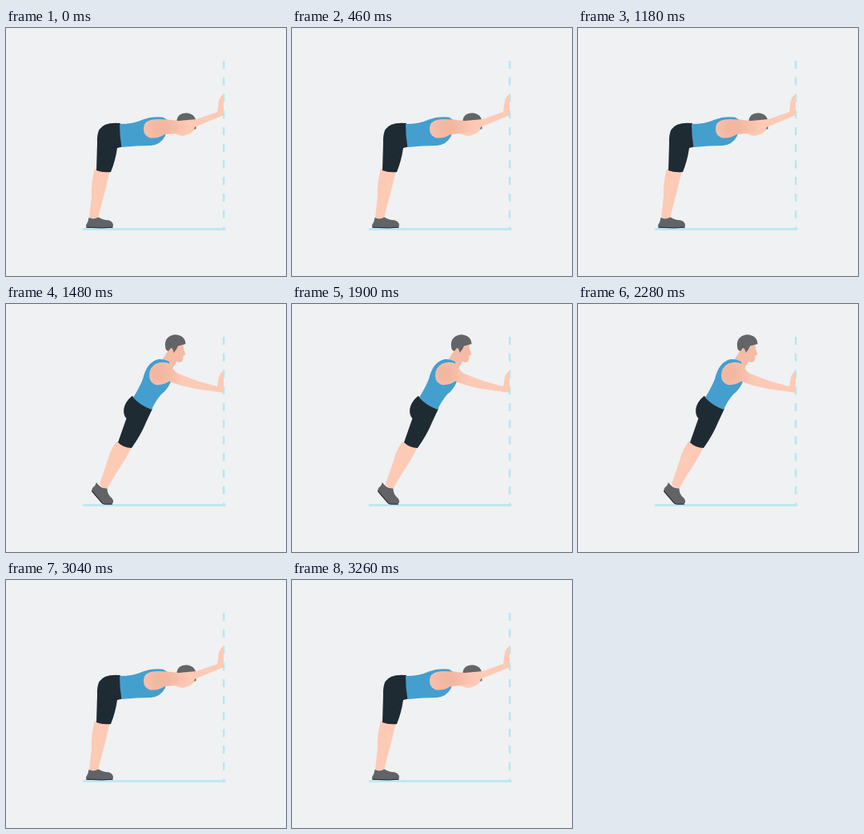
Write an HTML page that moves like this. It is 350 px wide and 310 px high and loops after 3280 ms.

```html
<!DOCTYPE html>
<html lang="en">
<head>
<meta charset="utf-8">
<title>Wall stretch</title>
<style>
  html, body { margin: 0; width: 100%; height: 100%; overflow: hidden; background: #eff1f2; }
  svg { display: block; width: 350px; height: 310px; }
  .light { fill: #fdcab6; }
  .face { fill: #f4bca7; }
  .hair { fill: #636467; }
  .shoe { fill: #626366; }
  .sole { fill: none; stroke: #353a3f; stroke-width: 1.3; stroke-linecap: round; }
  .shorts { fill: #1f2b33; }
  .shirt { fill: #449fcf; }
</style>
</head>
<body>
<svg viewBox="0 0 350 310">
  <defs>
    <radialGradient id="bentSkin" gradientUnits="userSpaceOnUse" cx="194" cy="125" r="36">
      <stop offset=".2" stop-color="#f2b7a1"/>
      <stop offset="1" stop-color="#fdcab6"/>
    </radialGradient>
    <radialGradient id="uprightSkin" href="#bentSkin" gradientUnits="userSpaceOnUse" cx="190" cy="87" r="32"/>
  </defs>
  <g fill="none" stroke="#b5e8f3" stroke-width="2.5">
    <path d="M97 251.4H273.5" stroke-linecap="round"/>
    <path d="M272.2 41V252" stroke-dasharray="10 10.75"/>
  </g>

  <g id="bent">
    <path class="hair" d="M213 117Q214 106.5 225 106.3Q237 107 237.5 118V126L232 128L215 118Z"/>
    <path class="light" d="M207 130L224 118L236 123L235 128L230 132L221 135Q213 134 207 130Z"/>
    <path class="light" d="M111 176Q106 195 107 210L104 238Q109 242 115 238Q118 225 123 207L130 178Z"/>
    <path class="shoe" d="M103.5 237Q109 240 115.5 236.5Q121 240 128 240.3Q134 242 134 246.5Q134 250 130 250H102Q99.5 249 100.2 246Q103 242 103.5 237Z"/>
    <path class="sole" d="M101 249.2L120 249.8L133 249.2"/>
    <path class="shorts" d="M143 119Q123 117 116.5 127Q113.5 133 114 144L113 178Q121 181 131 180Q137 165 139 150L145 148.5Z"/>
    <path class="shirt" d="M142 120Q159 120 171 114.5Q182 110 196 111.5L202 115L199 135Q193 146 181 147Q163 147 144.5 149Q142 135 142 120Z"/>
    <path fill="url(#bentSkin)" d="M172 126Q172 117 181 115Q190 112.5 216 116L238 114L264 105L266 91Q268 84 272 83V109L238 123Q222 132 198 133Q189 139 179 137Q172 134 172 126Z"/>
  </g>

  <g id="upright">
    <path class="face" d="M203 58L195 70L207 83L214 70Z"/>
    <path class="face" d="M203 48L221 46Q221.5 54 222.5 57L224.3 63L221.5 65Q222 73 216.5 73Q209 71 204 62Z"/>
    <path class="hair" d="M199.5 56Q196 41 211 38.3Q224 39 224.5 50L215 52.5Q213 58 209.5 61Q209 55 206 55L203 59Q200 58 199.5 56Z"/>
    <path class="light" d="M138 172Q130 183 127 196L117 225Q120 231 127 230Q131 222 142 205Q150 193 157 179Z"/>
    <path class="shoe" d="M113 223Q118 231 126.5 230.5Q126.5 237 131 241.5Q134.5 244 134 248Q133 250.5 130 250.5H124Q121 250.5 119 248L108.5 236Q106 233 108.5 229.5Q112 227 113 223Z"/>
    <path class="sole" d="M107.6 234L120 248.6Q121.5 250.2 124 250.2H132.5"/>
    <path class="shorts" d="M157.5 115Q149 122 147.3 131Q146.5 139 150.5 143L140 173Q147 180 157 180Q169 163 175 148L183 131Z"/>
    <path class="shirt" d="M159 117Q167 104 171 94Q176 72 191 69Q198 68.5 204 72L206 97Q202 107 194 113Q187 121 182 132Q168 127 159 117Z"/>
    <path fill="url(#uprightSkin)" d="M179 90Q179 79 188 74.5Q199 70.5 206 76Q209 83 215 87L240 96.5L264 103L266 92Q268 85 272 84V111L237 106Q216 102 204 96.5Q196 102 187 101Q179.500 98 179 90Z"/>
  </g>
</svg>
<script>
const LOOP = 3280, STAND_UP = 1220, BEND_DOWN = 2560;
const bent = document.getElementById('bent');
const upright = document.getElementById('upright');
const start = performance.now();

function frame() {
  const t = (performance.now() - start) % LOOP;
  const standing = t >= STAND_UP && t < BEND_DOWN;
  bent.style.display = standing ? 'none' : '';
  upright.style.display = standing ? '' : 'none';
  requestAnimationFrame(frame);
}
frame();
</script>
</body>
</html>
```
